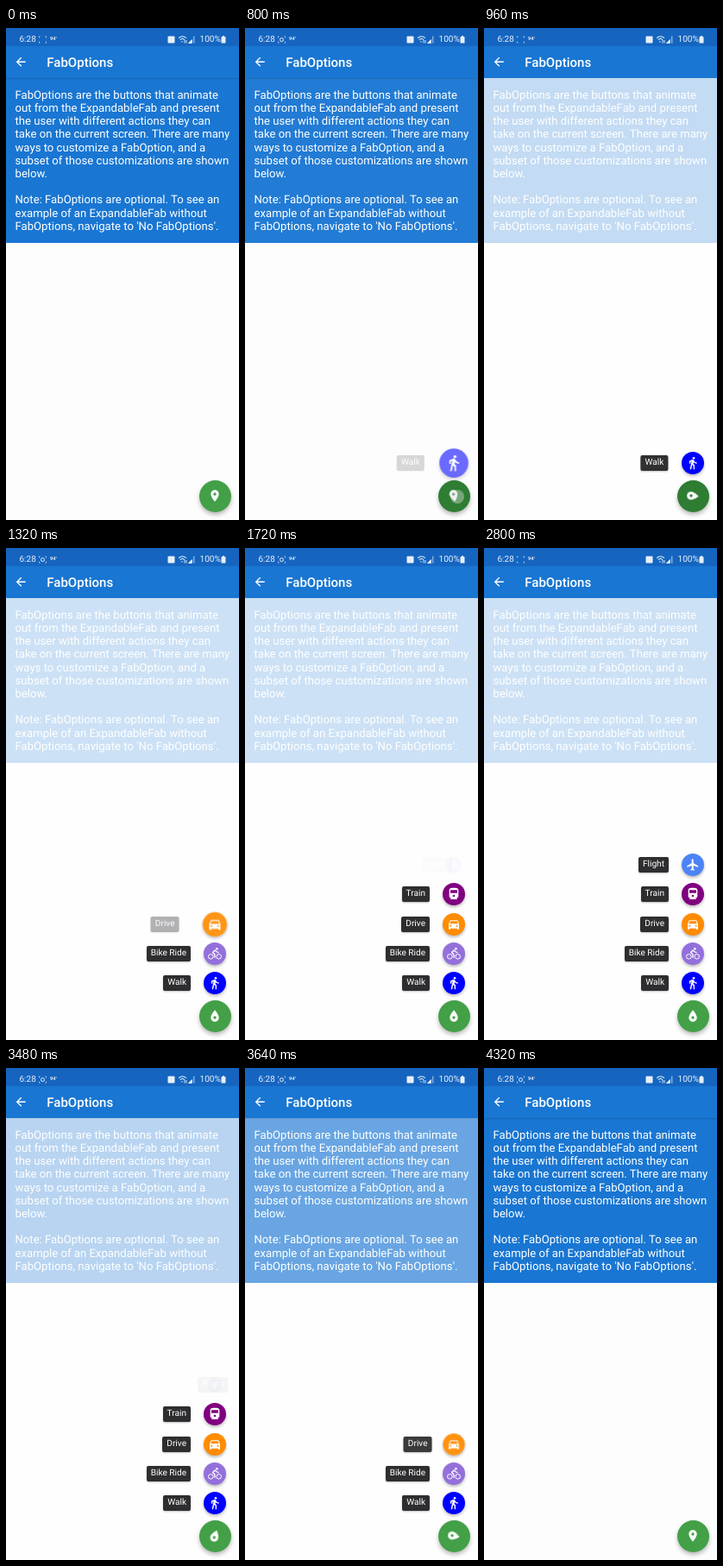
Recreate the animation shown at these times as an HTML page. Size 270 px wide and 570 px high, loop 4.72 s.

```html
<!DOCTYPE html>
<html lang="en">
<head>
<meta charset="utf-8">
<title>FabOptions</title>
<style>
html, body { margin: 0; width: 100%; height: 100%; overflow: hidden; background: #fefdfe; }
body { position: relative; font-family: Roboto, "Noto Sans", sans-serif; color: #fff; text-rendering: geometricPrecision; }
body *, svg { position: absolute; box-sizing: border-box; }
svg * { position: static; }
.status { left: 0; top: 0; width: 100%; height: 21px; background: #1565c0; z-index: 2; }
.status span { white-space: nowrap; line-height: 12px; color: #e8f0fa; }
.bar { left: 0; top: 21px; width: 100%; height: 37px; background: #1976d2; z-index: 2; }
.bar h1 { left: 47.3px; top: 9px; margin: 0; font-size: 15px; font-weight: 500; line-height: 20px; }
.bar svg { left: 9.3px; top: 10.3px; }
.about { left: 0; top: 58px; width: 100%; height: 191px; background: #1976d2;
  box-shadow: inset 0 2px 2px -1px rgba(0,0,0,.16); }
.about p { left: 10.5px; top: 12.6px; margin: 0; font-size: 13.15px; line-height: 15.24px; white-space: pre; }
.veil { left: 0; top: 58px; width: 100%; bottom: 0; background: #fff; opacity: 0; }
.fab { border-radius: 50%; display: grid; place-items: center; }
.fab svg { position: static; }
.main { left: 223.7px; top: 523.7px; width: 37px; height: 37px; background: #43a047; box-shadow: 0 3px 5px rgba(0,0,0,.28); }
.mini { left: 229px; width: 26px; height: 26px; box-shadow: 0 2px 3.5px rgba(0,0,0,.28); opacity: 0; }
.label { right: calc(100% - 214px); height: 18px; padding: 0 5px; border-radius: 2px; background: #2e2e30;
  font-size: 10.1px; line-height: 18.6px; white-space: nowrap; box-shadow: 0 1px 2px rgba(0,0,0,.25); opacity: 0; }
.touch { left: 238px; top: 535px; width: 16px; height: 16px; border-radius: 50%; background: rgba(225,225,225,.42); opacity: 0; }
</style>
</head>
<body>
<div class="about"><p>FabOptions are the buttons that animate
out from the ExpandableFab and present
the user with different actions they can
take on the current screen. There are many
ways to customize a FabOption, and a
subset of those customizations are shown
below.

Note: FabOptions are optional. To see an
example of an ExpandableFab without
FabOptions, navigate to 'No FabOptions'.</p></div>
<div class="veil"></div>

<div class="status">
  <span style="left:15.5px;top:7.5px;font-size:10px">6:28</span>
  <span style="left:51px;top:7px;font-size:5.5px;font-weight:700">94°</span>
  <span style="left:224.5px;top:7.5px;font-size:10.1px">100%</span>
  <svg width="270" height="21" fill="none" stroke="#e8f0fa">
    <path d="M39.5 9.8h-1v1.6M45.5 9.8h1v1.6M39.5 17.2h-1v-1.6M45.5 17.2h1v-1.6" stroke-width=".9" opacity=".75"/>
    <circle id="rec" cx="42.5" cy="13.6" r="2" stroke-width="1"/>
    <rect x="187.5" y="9.5" width="8" height="8" rx="1" fill="#e8f0fa" stroke="none"/>
    <path d="M200 11.6q4.5-3.6 9 0M201.8 13.6q2.7-2.2 5.2 0M203.4 15.4l1 1" stroke-width="1.1"/>
    <path d="M207 17.5v-3.5M209 14v3.5" stroke-width=".9"/>
    <path d="M211.5 17.5l4-4v4zM217.8 17.5v-8" fill="#e8f0fa" stroke-width=".8"/>
    <path d="M249.5 10.2h1.4v-1.2h2.2v1.2h1.4v7.4h-5z" fill="#e8f0fa" stroke="none"/>
  </svg>
</div>
<div class="bar">
  <svg width="16.5" height="16.5" viewBox="0 0 24 24" fill="#fff"><path d="M20 11H7.83l5.59-5.59L12 4l-8 8 8 8 1.41-1.41L7.83 13H20z"/></svg>
  <h1>FabOptions</h1>
</div>

<div id="options"></div>
<div class="fab main">
  <svg id="pin" width="16" height="16" viewBox="0 0 24 24" fill="#fff" fill-rule="evenodd"><path d="M12 2C8.13 2 5 5.13 5 9c0 5.25 7 13 7 13s7-7.75 7-13c0-3.87-3.13-7-7-7zM9.5 9a2.5 2.5 0 1 0 5 0a2.5 2.5 0 1 0-5 0z"/></svg>
</div>
<div class="touch"></div>

<script>
const LOOP = 4720, OPEN = 732, STEP = 243, CLOSE = 3372, SHUT = 125;
const SMOOTH = 'cubic-bezier(.3642,0,.6358,1)';
// Overshoot with tension 3.5: 4.5(x-1)^3 + 3.5(x-1)^2 + 1
const OVER = 'cubic-bezier(.33333,2.16667,.66667,1)';

const $ = s => document.querySelector(s);

// stops: [ms, value, easing towards the next stop]
function track(el, prop, stops) {
  const first = stops[0], last = stops[stops.length - 1];
  const all = [[0, first[1]], ...stops, [LOOP, last[1]]];
  el.animate(all.map(([ms, value, easing = 'linear']) => ({ offset: ms / LOOP, [prop]: value, easing })),
    { duration: LOOP, iterations: Infinity });
}

// Go from a to b at one time, then from b to c at a later time
function swing(el, prop, [a, b, c], [t1, d1, e1], [t2, d2, e2]) {
  track(el, prop, [[t1, a, e1], [t1 + d1, b], [t2, b, e2], [t2 + d2, c]]);
}

const options = [
  ['Walk', '#0000ff', '<circle cx="13.5" cy="3.5" r="2"/><path d="M9.8 8.9L7 23h2.1l1.8-8 2.1 2v6h2v-7.5l-2.1-2 .6-3C14.8 12 16.8 13 19 13v-2c-1.9 0-3.5-1-4.3-2.4l-1-1.6c-.4-.6-1-1-1.7-1-.3 0-.5.1-.8.1L6 8.3V13h2V9.6z"/>'],
  ['Bike Ride', '#9370db', '<circle cx="15.5" cy="3.5" r="2"/><g fill="none" stroke="#fff"><circle cx="5" cy="17" r="4.2" stroke-width="1.5"/><circle cx="19" cy="17" r="4.2" stroke-width="1.5"/><path d="M19 10c-2 0-3.6-.8-4.6-1.9l-2.1-2.1L8.4 9.8 12 13.4V19" stroke-width="2" stroke-linejoin="round"/></g>'],
  ['Drive', '#ff8c00', '<path d="M18.92 6A1.5 1.5 0 0 0 17.5 5h-11A1.5 1.5 0 0 0 5.08 6L3 12v8q0 1 1 1h1q1 0 1-1v-1h12v1q0 1 1 1h1q1 0 1-1v-8zM5 14.5a1.5 1.5 0 1 0 3 0a1.5 1.5 0 1 0-3 0zM16 14.5a1.5 1.5 0 1 0 3 0a1.5 1.5 0 1 0-3 0zM5 11l1.5-4.5h11L19 11z"/>'],
  ['Train', '#800080', '<path d="M4 15.5C4 17.43 5.57 19 7.5 19L6 20.5v.5h12v-.5L16.5 19c1.93 0 3.5-1.57 3.5-3.5V5c0-3.5-3.58-4-8-4s-8 .5-8 4zM10 15a2 2 0 1 0 4 0a2 2 0 1 0-4 0zM18 10H6V5h12z"/>'],
  ['Flight', '#4c84f5', '<path d="M21 16v-2l-8-5V3.5a1.5 1.5 0 0 0-3 0V9l-8 5v2l8-2.5V19l-2 1.5V22l3.5-1 3.5 1v-1.5L13 19v-5.5z"/>']
];

function add(cls, html, style) {
  const el = document.createElement('div');
  el.className = cls;
  el.innerHTML = html;
  Object.assign(el.style, style);
  document.body.insertBefore(el, $('#options'));
  return el;
}

options.forEach(([name, color, icon], i) => {
  const y = 504 - 34.25 * i;
  const t = OPEN + STEP * i;
  const end = [CLOSE + SHUT * (options.length - 1 - i), SHUT, SMOOTH];
  const label = add('label', name, { top: y - 9 + 'px' });
  const fab = add('fab mini',
    `<svg width="16" height="16" viewBox="0 0 24 24" fill="#fff" fill-rule="evenodd">${icon}</svg>`,
    { top: y - 13 + 'px', background: color });
  swing(fab, 'opacity', [0, 1, 0], [t, 125, SMOOTH], end);
  swing(fab, 'scale', ['0', '1', '.6'], [t, 125, OVER], end);
  swing(label, 'opacity', [0, 1, 0], [t, 245, SMOOTH], end);
  swing(label, 'translate', ['45px', '0px', '45px'], [t, 245, OVER], end);
});

swing($('.veil'), 'opacity', [0, .78, 0], [768, 225, SMOOTH], [CLOSE, 500, SMOOTH]);
swing($('#pin'), 'rotate', ['0deg', '-180deg', '0deg'], [720, 500, SMOOTH], [CLOSE, 500, SMOOTH]);
swing($('.main'), 'backgroundColor', ['#43a047', '#2e7d32', '#43a047'], [630, 120], [1000, 200]);
swing($('.touch'), 'opacity', [0, 1, 0], [639, 1], [840, 60]);

// Recording light: off for 300 ms in every 933 ms
const blink = [];
for (let k = 0; k < 5; k++) {
  const off = 933 * k;
  blink.push([off, 0], [off + 290, 0], [off + 320, 1], [off + 932, 1]);
}
track($('#rec'), 'opacity', blink);
</script>
</body>
</html>
```
